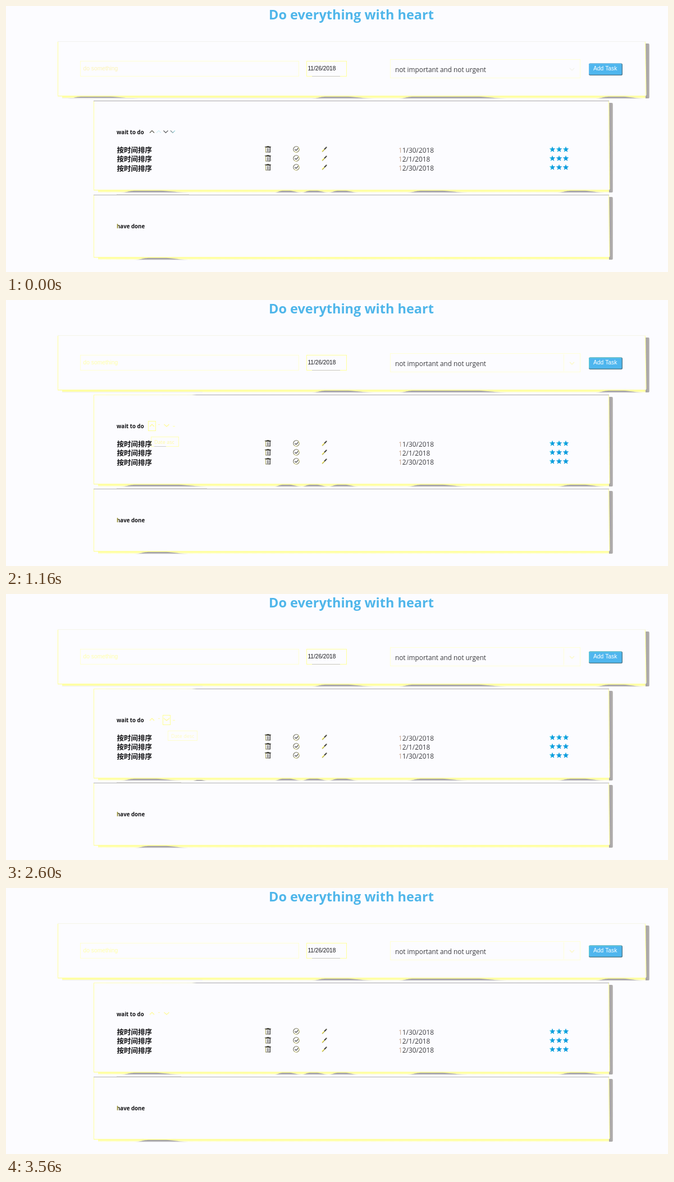
An HTML page with a canvas for the animation above (4440 ms loop, 1179 px wide and 475 px high).

```html
<!DOCTYPE html>
<html lang="en">
<head>
<meta charset="utf-8">
<title>Task list</title>
<style>
html, body { margin: 0; width: 100%; height: 100%; overflow: hidden; background: #fcfcff; }
canvas { display: block; }
</style>
</head>
<body>
<canvas id="stage" width="1179" height="475"></canvas>
<script>
const c = document.getElementById('stage').getContext('2d');
const LOOP = 4440;
const BG = '#fcfcff', PALE = '#ffffc4', YELLOW = '#ffff9c', GREY = '#aaa8a8', INK = '#222226';
const UI = '"Open Sans", "Noto Sans", sans-serif';
const ARIAL = '"Liberation Sans", Arial, sans-serif';
const CJK = '"Noto Sans CJK SC", "Noto Sans CJK", sans-serif';
const DATES = ['11/30/2018', '12/1/2018', '12/30/2018'];

const clamp = v => Math.max(0, Math.min(1, v));
const between = (t, a, b) => t >= a && t < b;

function rect(x, y, w, h, color) {
  c.fillStyle = color;
  c.fillRect(x, y, w, h);
}

function frame(x, y, w, h, color) {
  c.strokeStyle = color;
  c.lineWidth = 1;
  c.strokeRect(x + 0.5, y + 0.5, w - 1, h - 1);
}

function text(str, x, y, font, color) {
  c.font = font;
  c.fillStyle = color;
  c.fillText(str, x, y);
}

function line(points, color, width = 1) {
  c.strokeStyle = color;
  c.lineWidth = width;
  c.beginPath();
  points.forEach(([x, y], i) => i ? c.lineTo(x, y) : c.moveTo(x, y));
  c.stroke();
}

function fade(x0, y0, x1, y1, ...stops) {
  const g = c.createLinearGradient(x0, y0, x1, y1);
  stops.forEach(([p, color]) => g.addColorStop(p, color));
  return g;
}

// Grey swell in the shadow under a panel
function swell(x0, x1, y, h) {
  const w = x1 - x0, rise = Math.min(28, w * 0.35), fall = Math.min(60, w * 0.5);
  c.beginPath();
  c.moveTo(x0, y + h);
  c.bezierCurveTo(x0 + rise * 0.5, y + h * 0.6, x0 + rise * 0.5, y, x0 + rise, y);
  c.lineTo(x1 - fall, y);
  c.bezierCurveTo(x1 - fall * 0.5, y, x1 - fall * 0.5, y + h * 0.7, x1, y + h);
  c.closePath();
  c.fillStyle = fade(0, y, 0, y + h, [0, '#969498'], [0.55, '#aeacaf'], [1, '#dcdbde']);
  c.fill();
}

function panel(x, y, r, b, swells) {
  c.fillStyle = fade(r, 0, r + 8, 0, [0, '#a6a3a4'], [0.7, '#b0adad'], [1, '#e2e1e3']);
  c.beginPath();
  c.moveTo(r - 1, y + 4);
  c.lineTo(r + 5, y + 4);
  c.quadraticCurveTo(r + 7, y + 4, r + 7, y + 7);
  c.lineTo(r + 7, b + 2);
  c.quadraticCurveTo(r + 7, b + 4, r + 4, b + 4);
  c.lineTo(r - 1, b + 4);
  c.fill();
  rect(x + 8, b, r - x - 8, 4, fade(0, b, 0, b + 4, [0, YELLOW], [0.6, '#ffffb0'], [1, '#fdfdec']));
  swells.forEach(([a, z]) => swell(a, z, b + 0.8, 3.8));
  c.fillStyle = BG;
  c.beginPath();
  c.moveTo(x, y);
  c.lineTo(r - 1, y);
  c.lineTo(r + 1, b - 1);
  c.lineTo(r - 1, b);
  c.lineTo(x, b);
  c.fill();
  line([[r - 0.5, y + 1], [r + 0.8, b - 2]], '#ffffb2', 1.5);
  rect(x, y, 1, b - y, YELLOW);
  rect(x, b - 1, r - x, 1.5, '#ffffa6');
}

function chevron(x, y, dir, color, size = 4) {
  line([[x - size, y + 2 * dir], [x, y - 2 * dir], [x + size, y + 2 * dir]], color, 1.1);
}

function trash(x, y) {
  rect(x - 5, y - 5, 11, 1.2, '#3c3c3c');
  rect(x - 2, y - 6, 5, 1, '#6a6a5c');
  c.strokeStyle = fade(x - 5, 0, x + 5, 0, [0, '#f4ee70'], [0.25, '#77735a'], [1, '#333']);
  c.lineWidth = 1.1;
  c.strokeRect(x - 3.5, y - 3.5, 8, 8.5);
  rect(x - 1, y - 2, 1, 6, '#444');
  rect(x + 1.5, y - 2, 1, 6, '#444');
}

function checkMark(x, y) {
  c.strokeStyle = fade(x - 5, y - 5, x + 5, y + 5, [0, '#55554a'], [0.5, '#8a875f'], [0.65, '#d8d268'], [1, '#444']);
  c.lineWidth = 1.1;
  c.beginPath();
  c.arc(x, y, 5.2, 0, Math.PI * 2);
  c.stroke();
  line([[x - 2.5, y], [x - 0.5, y + 2], [x + 3.5, y - 2]], '#3e3e3e', 1.1);
}

function pencil(x, y) {
  line([[x - 4, y + 4], [x, y]], '#f0e860', 2);
  line([[x - 3.5, y + 4.5], [x + 0.5, y + 0.5]], '#77755c', 0.8);
  line([[x, y], [x + 3, y - 3]], '#3a3a36', 2);
  rect(x + 2.5, y - 4.5, 2, 2, '#4a4a3e');
}

function star(x, y, color) {
  c.fillStyle = color;
  c.beginPath();
  for (let i = 0; i < 10; i++) {
    const a = -Math.PI / 2 + i * Math.PI / 5, r = i % 2 ? 2.4 : 5.6;
    c.lineTo(x + r * Math.cos(a), y + r * Math.sin(a));
  }
  c.fill();
}

function form(fresh) {
  frame(132, 98, 390, 28, '#ffffd2');
  text('do something', 137.5, 115, '10.3px ' + ARIAL, fresh ? '#fbf3b4' : '#ffffa8');

  frame(535, 98, 72, 28, YELLOW);
  rect(545, 125, 50, 1, '#c9c8bd');
  text('11/26/2018', 537.5, 115, '10.1px ' + ARIAL, '#18181c');

  frame(684, 95, 339, 34, '#ffffd6');
  if (!fresh) rect(993, 97, 1, 30, '#ffffd6');
  chevron(1008, 113, -1, fresh ? '#f2f2ea' : '#fbf9c0');
  text('not important and not urgent', 693, 118, '11.8px ' + UI,
    fade(0, 107, 0, 120, [0, '#77777a'], [0.35, '#3a3a3e'], [1, '#3a3a3e']));

  c.fillStyle = '#4e7387';
  c.beginPath();
  c.roundRect(1038, 102.5, 60, 21.5, 2.5);
  c.fill();
  c.fillStyle = fresh ? '#62bdf0' : '#5cc8d8';
  c.beginPath();
  c.roundRect(1038, 102.5, 58.5, 20, 2);
  c.fill();
  rect(1039.5, 104, 57, 18.5, '#4fb6ee');
  text('Add Task', 1046, 115, '10.3px ' + ARIAL, '#fff');
}

function sorters(fresh, hover) {
  if (fresh) {
    chevron(260, 224.5, 1, '#57564a');
    chevron(272, 224.5, 1, '#d2eff4');
    chevron(284.5, 224.5, -1, '#57575a');
    chevron(297, 224.5, -1, fade(293, 0, 301, 0, [0, '#707476'], [1, '#9be4ee']));
    return;
  }
  chevron(260, 224, 1, '#fffb92');
  rect(271, 222, 3, 1, '#fff7ae');
  chevron(286, 224, -1, '#fffa94', hover === 2 ? 5 : 4.5);
  if (hover >= 0) {
    rect(297, 225, 4, 1, '#ffffa8');
    frame([253, 267, 279][hover], 216, 14, 18, '#ffff94');
  }
}

function tooltip(label, x, w, alpha) {
  if (alpha <= 0) return;
  c.globalAlpha = alpha;
  rect(x, 244, w, 18, BG);
  frame(x, 244, w, 18, '#ffffb4');
  text(label, x + 6, 256.5, '9px ' + UI, '#fffa9e');
  c.globalAlpha = 1;
}

function tasks(reversed) {
  for (let i = 0; i < 3; i++) {
    const y = 256 + i * 16;
    text('按时间排序', 197.5, 262 + i * 16.4, 'bold 12.5px ' + CJK, '#111114');
    trash(466, y);
    checkMark(517, y);
    pencil(567, y);
    text(DATES[reversed ? 2 - i : i], 699, 262 + i * 16.2, '11.9px ' + UI,
      fade(699, 0, 712, 0, [0, '#e9bd9c'], [0.45, '#a98e80'], [0.6, '#3c3c40'], [1, '#3c3c40']));
    for (let k = 0; k < 3; k++) {
      const x = 973 + k * 12;
      star(x, y + 0.3, fade(x - 5, 0, x + 5, 0,
        [0, k && i ? '#1298d8' : '#2cc9dc'], [0.5, '#0c9fe0'], [1, '#0a8fd6']));
    }
  }
  // Tops of the first row are washed out
  rect(698, 251, 65, 2.5, 'rgba(252,252,255,.55)');
}

function draw(t) {
  const fresh = t < 40;
  const hover = between(t, 640, 1960) ? 0 : between(t, 1960, 2200) ? 1 : between(t, 2200, 3480) ? 2 : -1;
  const reversed = between(t, 1300, 2920);
  const tip1 = clamp((t - 960) / 120) * clamp((1320 - t) / 120);
  const tip2 = clamp((t - 2560) / 60) * clamp((2920 - t) / 120);

  rect(0, 0, 1179, 475, BG);
  text('Do everything with heart', 468, 24, 'bold 23.5px ' + UI, '#4fb6ea');

  const top = [[545, 655], [700, 892], [1050, 1136]];
  if (fresh) top.unshift([110, 236]);
  panel(92, 63, 1139, 161, top);
  rect(92, 63, 1047, 1, fresh ? '#f1f1ee' : '#f5f5e8');
  rect(100, 164, fresh ? 450 : 250, 1, '#eeeeea');

  const end = tip1 > 0 ? 358 : t < 1000 ? 326 : 312;
  const mid = [[205, end], [478, 526], [527, 574], [575, 627], [715, 822], [982, 1066]];
  panel(156, 169, 1074, 329, mid);
  if (tip2 > 0) swell(333, 358, 332, 2);
  rect(156, 169, 918, 1, fresh ? GREY
    : fade(156, 0, 1074, 0, [0, '#ffffb4'], [0.19, '#f3f3cf'], [0.2, GREY], [1, GREY]));

  panel(156, 337, 1074, 449, [[230, 325]]);
  rect(156, 337, 918, 1, '#b4b3b3');
  rect(197, 336.5, end - 197, 1, '#b9b8b6');

  form(fresh);
  text('wait to do', 197, 229, 'bold 9.7px ' + UI, '#111114');
  text('have done', 197, 397, 'bold 9.7px ' + UI,
    fade(197, 0, 204, 0, [0, '#c8bd30'], [0.5, '#38360f'], [1, '#111114']));
  sorters(fresh, hover);
  tooltip('Date asc', 258, 50, tip1);
  tooltip('Date desc', 288, 53, tip2);
  if (tip1 > 0) {
    c.globalAlpha = tip1;
    rect(264, 261, 21, 1, '#cccbca');
    c.globalAlpha = 1;
  }
  tasks(reversed);
}

let start;
function tick(now) {
  if (start === undefined) start = now;
  draw((now - start) % LOOP);
  requestAnimationFrame(tick);
}
draw(0);
requestAnimationFrame(tick);
</script>
</body>
</html>
```
